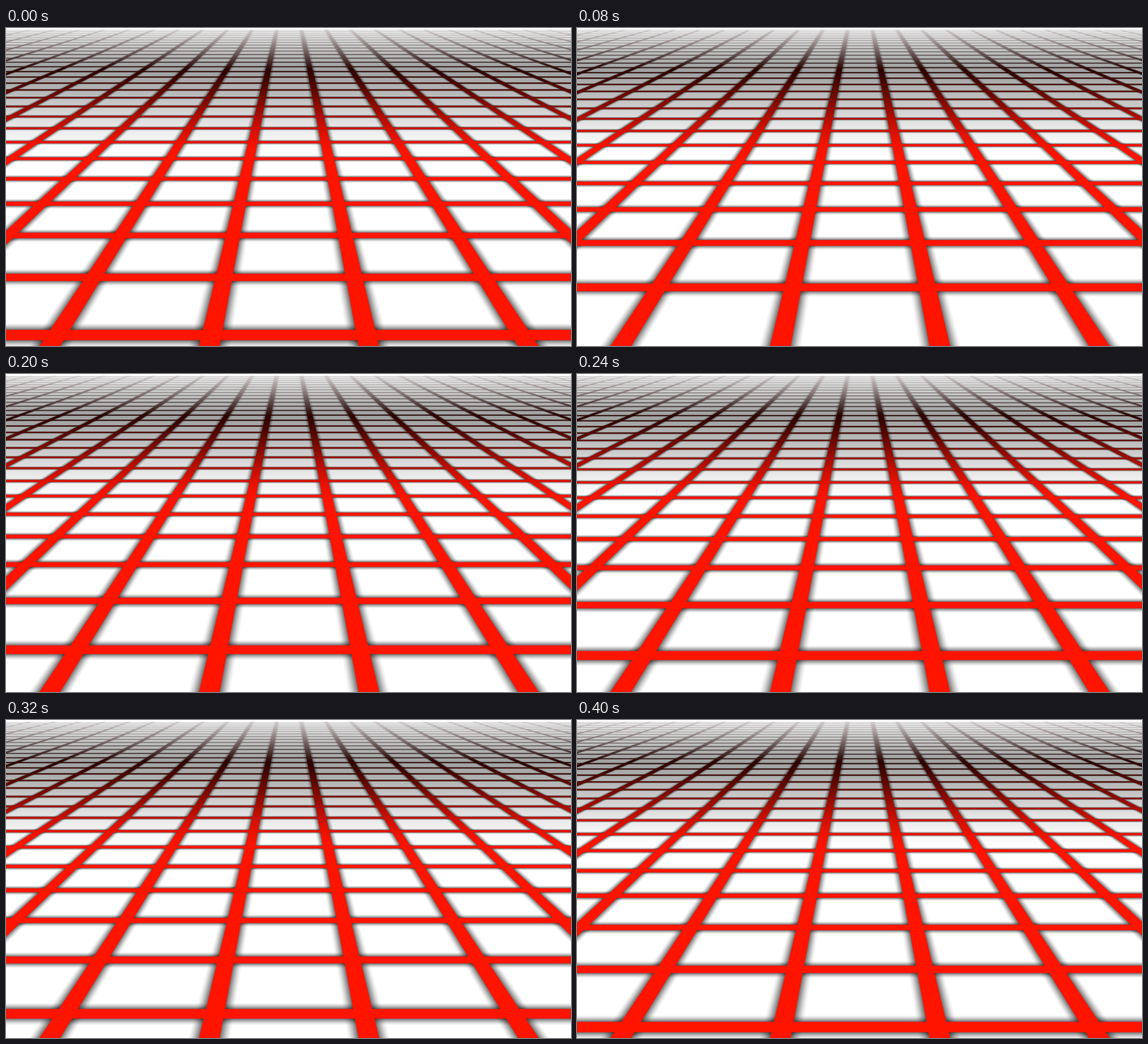
These frames come from a looping animation (960 px wide and 540 px high, 0.42 s). An HTML page with a canvas:

```html
<!DOCTYPE html>
<html lang="en">
<head>
<meta charset="utf-8">
<title>Endless grid</title>
<style>
  html, body { margin: 0; width: 100%; height: 100%; overflow: hidden; background: #fff; }
  canvas { display: block; }
</style>
</head>
<body>
<canvas id="stage" width="960" height="540"></canvas>
<script>
const W = 960, H = 540;
const LOOP = 420, STEP = 20, CELL_TIME = 400;
const HORIZON = -95, CENTER = 481, DEPTH = 3262, SPREAD = 0.4268, PHASE = 0.293;
const NEAR = 5.12;                           // rungs closer than this have left the sheet
const RAIL = { half: 0.065, glow: 0.07 };    // lines running into the distance
const RUNG = { half: 0.076, glow: 0.1 };     // lines running across
const RED = [255, 20, 0];

const ctx = document.getElementById('stage').getContext('2d');
const clamp = v => Math.max(0, Math.min(1, v));
const smooth = v => { v = clamp(v); return v * v * (3 - 2 * v); };
const toNearestLine = v => Math.abs(v - Math.round(v));

// Share of a pixel covered by a line; all lengths are in grid cells.
const cover = (dist, line, pixel) =>
  Math.min(clamp((line.half + pixel / 2 - dist) / pixel), 2 * line.half / pixel);

// Dark halo beside a line.
const halo = (dist, line, pixel) =>
  0.56 * clamp(1 - Math.max(0, dist - line.half) / (line.glow + pixel / 2)) ** 1.5;

function render(time) {
  const image = ctx.createImageData(W, H), px = image.data;
  const offset = PHASE - time / CELL_TIME;
  px.fill(255);
  for (let y = 3; y < H; y++) {
    const drop = y + 0.5 - HORIZON;
    const depth = DEPTH / drop;
    const rungDepth = Math.round(depth - offset) + offset;
    const rungDist = rungDepth < NEAR ? 1 : Math.abs(depth - rungDepth);
    const rungPixel = depth / drop;
    const rung = cover(rungDist, RUNG, rungPixel);
    const rungHalo = halo(rungDist, RUNG, rungPixel);
    const railPixel = 1 / (SPREAD * drop);
    const fog = smooth((225 - y) / 185);
    const haze = 0.8 * clamp((70 - y) / 67);
    const floor = 255 * (1 - 0.4 * fog);
    const paint = RED.map(c => c * (1 - 0.88 * fog));

    for (let x = 0, i = y * W * 4; x < W; x++, i += 4) {
      const railDist = toNearestLine((x + 0.5 - CENTER) * railPixel + 0.5);
      const rail = cover(railDist, RAIL, railPixel);
      const line = 1 - (1 - rung) * (1 - rail);
      const light = floor * (1 - rungHalo) * (1 - halo(railDist, RAIL, railPixel));
      for (let c = 0; c < 3; c++) {
        const shade = light + (paint[c] - light) * line;
        px[i + c] = shade + (255 - shade) * haze;
      }
    }
  }
  return image;
}

const cache = [];
let shown = -1;

function draw() {
  const step = Math.floor(performance.now() % LOOP / STEP);
  if (step !== shown) {
    const key = step % (CELL_TIME / STEP);
    cache[key] ??= render(key * STEP);
    ctx.putImageData(cache[key], 0, 0);
    shown = step;
  }
  requestAnimationFrame(draw);
}
draw();
</script>
</body>
</html>
```
